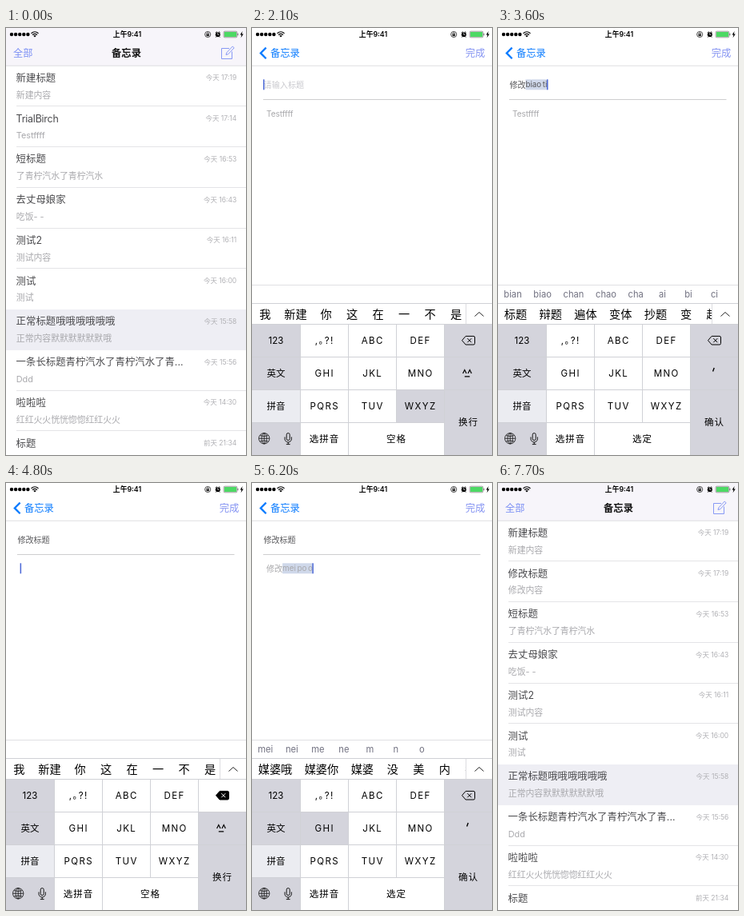
Recreate the animation shown at these times as an HTML page with a canvas. Size 300 by 534 pixels, loop 8000 ms.

```html
<!DOCTYPE html>
<html lang="zh-CN">
<head>
<meta charset="utf-8">
<title>备忘录</title>
<style>
html, body { margin: 0; width: 100%; height: 100%; overflow: hidden; background: #fff; }
canvas { display: block; width: 100vw; height: 100vh; }
</style>
</head>
<body>
<canvas id="stage"></canvas>
<script>
const W = 300, H = 534, LOOP = 8000, STEP = 100;
const FONT = 'Inter, "Noto Sans CJK SC", "Noto Sans CJK", sans-serif';
const KEY_GRAY = '#d4d4dc', LINE = '#d0d1d6', BLUE = '#0a7bff', VIOLET = '#7b8ff4';

const canvas = document.getElementById('stage');
const ctx = canvas.getContext('2d');
const ratio = window.devicePixelRatio || 1;
canvas.width = W * ratio;
canvas.height = H * ratio;

// ---------- content ----------
const OLD_TITLE = 'TrialBirch', OLD_BODY = 'Testffff';
const ROWS = [
  ['新建标题', '新建内容', '今天 17:19'],
  [OLD_TITLE, OLD_BODY, '今天 17:14'],
  ['短标题', '了青柠汽水了青柠汽水', '今天 16:53'],
  ['去丈母娘家', '吃饭- -', '今天 16:43'],
  ['测试2', '测试内容', '今天 16:11'],
  ['测试', '测试', '今天 16:00'],
  ['正常标题哦哦哦哦哦哦', '正常内容默默默默默默哦', '今天 15:58'],
  ['一条长标题青柠汽水了青柠汽水了青...', 'Ddd', '今天 15:56'],
  ['啦啦啦', '红红火火恍恍惚惚红红火火', '今天 14:30'],
  ['标题', '', '前天 21:34'],
];
const EDITED_ROW = ['修改标题', '修改内容', '今天 17:19'];

const PUNCTUATION = '， 。 ？ ！ 、 ……';
const STARTERS = '我 新建 你 这 在 一 不 是';
const FOLLOWERS = '的 了 一下 是 和 在 后 ，';

// One stage per key press: composed text | syllables | candidates
const stages = lines => lines.map(line => line.split('|'));
const XIUGAI = {
  result: '修改', keys: ['WXYZ', 'GHI', 'TUV', 'GHI', 'ABC', 'GHI'],
  stages: stages([
    'w|w x y z|我 在 一 想 要 有 这 是',
    'yi|yi xi zi w x y z|一 以 已 自 系 洗 西 字',
    'xiu|xiu yi xi zi w x y|修 秀 休 一 以 自 系 洗',
    'xiu g|xiu yi xi zi w x y|休过 修改 秀过 修 秀 休 一',
    'xiu ga|xiu yi xi zi w x y|修改 休干 修 秀 休 一 以',
    'xiu gai|xiu yi xi zi w x y|修改 修盖 修 秀 休 一 以',
  ]),
};
const BIAOTI = {
  result: '标题', keys: ['ABC', 'GHI', 'ABC', 'MNO', 'TUV', 'GHI'],
  stages: stages([
    'a|a b c|啊 不 才 把 被 从 吧 次',
    'bi|ai bi ci a b c|比 爱 次 此 必 笔 词 哎',
    'bia|bia cha ai bi ci a|差 查 茶 比 爱 次 此 必',
    'biao|bian biao chan chao cha ai bi ci|表 变 超 边 便 遍 差 查',
    'biao t|bian biao chan chao cha ai bi ci|变态 表态 产途 变 超 边 便',
    'biao ti|bian biao chan chao cha ai bi ci|标题 辩题 遍体 变体 抄题 变 超',
  ]),
};
const NEIRONG = {
  result: '内容', keys: ['MNO', 'DEF', 'GHI', 'PQRS', 'MNO', 'MNO', 'GHI'],
  stages: stages([
    'o|m n o|你 哦 那 吗 没 么 年 能',
    'me|me ne m n o|么 呢 哦 你 那 吗 没',
    'mei|mei nei me ne m n o|没 每 美 内 妹 么 呢 哦',
    'mei p|mei nei me ne m n o|没钱 没人 内容 没 美 内',
    'mei po|mei nei me ne m n o|媒婆 内弄 没破 没 美 内',
    'mei po o|mei nei me ne m n o|媒婆哦 媒婆你 媒婆 没 美 内 每',
    'nei rong|mei nei me ne m n o|内容 内熔 没 美 内 每 妹',
  ]),
};
// "confirm" is when the select key is pressed instead of a candidate
const TYPING = [
  { field: 'title', word: XIUGAI, from: 2100, to: 2800 },
  { field: 'title', word: BIAOTI, from: 2900, to: 3800, confirm: 3700 },
  { field: 'body', word: XIUGAI, from: 4900, to: 5600 },
  { field: 'body', word: NEIRONG, from: 5600, to: 6400, confirm: 6300 },
];

// ---------- timing ----------
const clamp = x => Math.max(0, Math.min(1, x));
const easeOut = x => 1 - (1 - clamp(x)) ** 3;
const smooth = x => (x = clamp(x), x * x * (3 - 2 * x));
const pageProgress = t => easeOut((t - 350) / 450) - easeOut((t - 6750) / 450);
const keyboardProgress = t => smooth((t - 900) / 326) - smooth((t - 6500) / 326);
const within = (t, a, b) => t >= a && t < b;

function editorState(t) {
  const typed = field => TYPING.filter(s => s.field === field && s.to <= t).map(s => s.word.result).join('');
  const remaining = (text, start, pace) => text.slice(0, Math.max(0, text.length - Math.max(0, Math.floor((t - start) / pace))));
  const state = {
    title: remaining(OLD_TITLE, 1300, 70) || typed('title'),
    body: remaining(OLD_BODY, 4000, 100) || typed('body'),
    focus: !within(t, 1000, 6600) ? '' : t < 3900 ? 'title' : 'body',
    marked: '', syllables: '', pressed: '',
  };
  if (within(t, 1300, 2100) || within(t, 4000, 4900)) state.pressed = 'delete';
  const field = t < 3900 ? 'title' : 'body';
  state.candidates = !state[field] ? STARTERS : typed(field) ? FOLLOWERS : PUNCTUATION;

  const active = TYPING.find(s => within(t, s.from, s.to));
  if (active) {
    const { keys, stages } = active.word;
    const index = Math.round((t - active.from) / STEP);
    state.pressed = active.confirm <= t ? 'space' : keys[index] || '';
    if (index) [state.marked, state.syllables, state.candidates] = stages[Math.min(index, stages.length) - 1];
  }
  return state;
}

// ---------- drawing helpers ----------
function setFont(size, weight = 400, spacing = 0) {
  ctx.font = `${weight} ${size}px ${FONT}`;
  ctx.letterSpacing = spacing + 'px';
}
function text(str, x, y, size, color, { align = 'left', weight, spacing = 0 } = {}) {
  setFont(size, weight, spacing);
  ctx.textAlign = align;
  ctx.fillStyle = color;
  ctx.fillText(str, align === 'center' ? x + spacing / 2 : x, y + size * 0.37);
  return ctx.measureText(str).width;
}
function rect(x, y, w, h, color) {
  ctx.fillStyle = color;
  ctx.fillRect(x, y, w, h);
}
function stroke(path, color, width = 1) {
  ctx.strokeStyle = color;
  ctx.lineWidth = width;
  ctx.stroke(new Path2D(path));
}
function fill(path, color) {
  ctx.fillStyle = color;
  ctx.fill(new Path2D(path));
}
function dot(x, y, r, color) {
  ctx.beginPath();
  ctx.arc(x, y, r, 0, 7);
  ctx.fillStyle = color;
  ctx.fill();
}
function shifted(x, y, alpha, draw) {
  ctx.save();
  ctx.translate(x, y);
  ctx.globalAlpha *= alpha;
  draw();
  ctx.restore();
}

// ---------- screens ----------
function drawStatusBar() {
  for (let i = 0; i < 5; i++) dot(7 + i * 5.1, 8, 2.2, '#000');
  stroke('M31.5 6.7Q36 2.8 40.5 6.7M33 8.6Q36 6 39 8.6', '#000', 1.2);
  fill('M34.2 9.7Q36 8.3 37.8 9.7L36 11.6Z', '#000');
  text('上午9:41', 151.5, 8, 8.8, '#000', { align: 'center', weight: 600 });
  stroke('M248.6 8a3.6 3.6 0 1 0 7.2 0a3.6 3.6 0 1 0 -7.2 0M251 8v-1a1.2 1.2 0 0 1 2.4 0v1', '#222', 0.8);
  rect(250.5, 7.6, 3.4, 2.6, '#222');
  dot(264.8, 8.2, 3, '#000');
  stroke('M262 5.9l1.5-1.4M267.6 5.9l-1.5-1.4M263 10.8l-.7.8M266.6 10.8l.7.8', '#000', 0.9);
  stroke('M264.8 6.2v2.2h1.6', '#fff', 0.7);
  stroke('M273.5 4.2h14q1.3 0 1.3 1.3v5q0 1.3-1.3 1.3h-14q-1.3 0-1.3-1.3v-5q0-1.3 1.3-1.3Z', '#555', 0.6);
  rect(273, 5, 15, 6, '#4cd964');
  rect(289.4, 6.7, 0.9, 2.6, '#555');
  fill('M295.6 4l-3 4.5h1.8l-.8 3.8 3.2-4.8h-1.9Z', '#000');
}

function drawList(t) {
  const rowHeight = 50.75;
  rect(0, 47, W, H, '#fff');
  ROWS.forEach((row, i) => {
    const top = 47 + i * rowHeight;
    const [title, body, time] = i === 1 && t >= 6600 ? EDITED_ROW : row;
    if (i === 6) rect(0, Math.round(top), W, 51, '#eeeef4');
    text(title, 12.6, top + 15.3, 12.4, '#4b4b4e', { spacing: /^[A-Z]/.test(title) ? -0.2 : 0 });
    text(body, 12.8, top + 36.7, 10.9, '#a9a9ad', { spacing: -0.05 });
    text(time, 288.2, top + 15.2, 8.5, '#b0b0b4', { align: 'right' });
    if (i !== 5 && i !== 6) rect(13, Math.floor(top + rowHeight), W, 1, '#e4e4e7');
  });
}

function drawField(str, x, y, color, focused, marked) {
  const width = str ? text(str, x, y, 10.1, color, { spacing: -0.05 }) : 0;
  if (!focused) return;
  let end = x + width;
  if (marked) {
    const syllables = marked.replaceAll(' ', '\u2006');
    setFont(9.8);
    const markedWidth = ctx.measureText(syllables).width;
    rect(end, y - 6.5, markedWidth, 13, '#cfd8ea');
    text(syllables, end, y, 9.8, color);
    end += markedWidth;
  }
  rect(end - 0.4, y - 6.5, 1.5, 13, '#4a67d6');
}

function drawDetail(state) {
  rect(0, 47, W, H, '#fff');
  if (!state.title && !state.marked) text('请输入标题', 14.6, 70.8, 10.1, '#c9c9ce');
  drawField(state.title, 14.4, 70.8, '#58585b', state.focus === 'title', state.focus === 'title' && state.marked);
  rect(14, 89, 271.5, 1, '#cececf');
  drawField(state.body, 18, 106.8, '#a8a8ab', state.focus === 'body', state.focus === 'body' && state.marked);
}

function drawNavigation(p) {
  rect(0, 0, W, 47, '#fff');
  shifted(0, 0, 1 - p, () => rect(0, 0, W, 47, '#f7f5fa'));
  rect(0, 46.8, W, 0.7, '#cfcfd3');
  shifted(0, 0, 1 - p, () => {
    text('全部', 9, 31, 12.2, VIOLET);
    text('备忘录', 150.5 - 109 * p, 31, 12.3, '#111', { align: 'center', weight: 600 });
    stroke('M279 25.5h-9.5v13h13v-9', VIOLET, 0.9);
    stroke('M275 33.5l.8-2.6 7.4-7.9 2 1.8-7.4 7.9Z', VIOLET, 0.9);
  });
  shifted(0, 0, p, () => {
    stroke('M17.6 24.6l-6.8 6.8 6.8 6.8', BLUE, 2.3);
    text('备忘录', 23 + 109 * (1 - p), 31, 12.3, BLUE);
    text('完成', 266.8, 31, 12.3, '#8493f2', { weight: 500 });
  });
}

// Cells fit their text but never get narrower than a minimum.
function drawStrip(items, y, size, gap, color, limit) {
  ctx.save();
  ctx.beginPath();
  ctx.rect(0, y - 12, limit, 24);
  ctx.clip();
  let x = 0;
  for (const item of items.split(' ')) {
    setFont(size);
    const width = ctx.measureText(item).width;
    const cell = Math.max(32.5, width + gap);
    text(item, x + (cell - width) / 2, y, size, color);
    x += cell;
  }
  ctx.restore();
}

function drawDeleteIcon(filled) {
  const shape = 'M262.5 390.7l4.6-5.3h9.8q1.6 0 1.6 1.6v7.4q0 1.6-1.6 1.6h-9.8Z';
  if (filled) fill(shape, '#000');
  stroke(shape, '#000', 1);
  stroke('M269.3 388.2l5 5M274.3 388.2l-5 5', filled ? '#fff' : '#000', 1);
}

function drawKeyboard({ marked, syllables, candidates, pressed }) {
  rect(0, 321, W, H - 321, '#fff');
  rect(0, 321, W, 1, '#e0e0e3');
  if (syllables) drawStrip(syllables, 333, 11.2, 14.6, '#717180', W);
  rect(0, 344, W, 1, LINE);
  const overflowing = candidates !== PUNCTUATION;
  drawStrip(candidates, 357.7, 14.2, 15.4, '#000', overflowing ? 268 : W);
  if (overflowing) {
    rect(267, 345, 1, 25, '#dcdde0');
    stroke('M278.5 360.5l5.5-5 5.5 5', '#222', 1);
  }

  const top = 370, size = 41;
  const key = (label, col, row, { cols = 1, rows = 1, color = '#fff', spacing = 1.4, name = label } = {}) => {
    const x = col * 60, y = top + row * size, w = cols * 60, h = rows * size;
    const down = name === pressed;
    rect(x, y, w, h, down ? (color === '#fff' ? KEY_GRAY : '#fff') : color);
    rect(x, y, w, 1, LINE);
    if (col) rect(x, y, 1, h, LINE);
    text(label, x + w / 2, y + h / 2, 11.5, '#000', { align: 'center', spacing });
  };
  const gray = { color: KEY_GRAY, spacing: 0 };
  ['123', '英文', '拼音', ''].forEach((label, r) =>
    key(label, 0, r, { ...gray, color: r === 2 ? '#ebecf1' : KEY_GRAY, name: 'side' }));
  [',｡?!', 'ABC', 'DEF', 'GHI', 'JKL', 'MNO', 'PQRS', 'TUV', 'WXYZ'].forEach((label, i) =>
    key(label, 1 + i % 3, Math.floor(i / 3)));
  key('选拼音', 1, 3, { spacing: 1 });
  key(marked ? '选定' : '空格', 2, 3, { cols: 2, spacing: 1, name: 'space' });
  key('', 4, 0, { ...gray, name: 'delete' });
  key('', 4, 1, { ...gray, name: 'face' });
  key(marked ? '确认' : '换行', 4, 2, { ...gray, rows: 2, spacing: 1 });

  drawDeleteIcon(pressed === 'delete');
  if (marked) stroke('M270.2 425l-1.6 4.5', '#000', 1.4);
  else stroke('M263.6 432l2.2-4.5 2.2 4.5M270 432l2.2-4.5 2.2 4.5M265.8 435.8h6.4', '#000', 1.2);

  stroke('M8.5 513.3a6.7 6.7 0 1 0 13.4 0a6.7 6.7 0 1 0 -13.4 0M12 513.3a3.2 6.7 0 1 0 6.4 0a3.2 6.7 0 1 0 -6.4 0' +
    'M8.5 513.3h13.4M15.2 506.6v13.4M10 509.6q5.2 2 10.4 0M10 517q5.2-2 10.4 0', '#111', 0.8);
  stroke('M43.2 508.6a2 2 0 0 1 4 0v5a2 2 0 0 1-4 0ZM41 511.5v2.3a4.2 4.2 0 0 0 8.4 0v-2.3M45.2 518v2.5M42.8 520.6h4.8', '#111', 1);
}

function draw(t) {
  ctx.setTransform(ratio, 0, 0, ratio, 0, 0);
  rect(0, 0, W, H, '#fff');
  const page = pageProgress(t), keyboard = keyboardProgress(t);
  const state = editorState(t);
  if (page < 1) shifted(-90 * page, 0, 1, () => drawList(t));
  if (page > 0) shifted(W * (1 - page), 0, 1, () => drawDetail(state));
  drawNavigation(page);
  drawStatusBar();
  if (keyboard > 0) shifted(0, Math.round(213 * (1 - keyboard)), 1, () => drawKeyboard(state));
}

const start = performance.now();
function tick() {
  const elapsed = (performance.now() - start) % LOOP;
  draw(Math.floor(elapsed / STEP) * STEP);
  requestAnimationFrame(tick);
}
tick();
</script>
</body>
</html>
```
